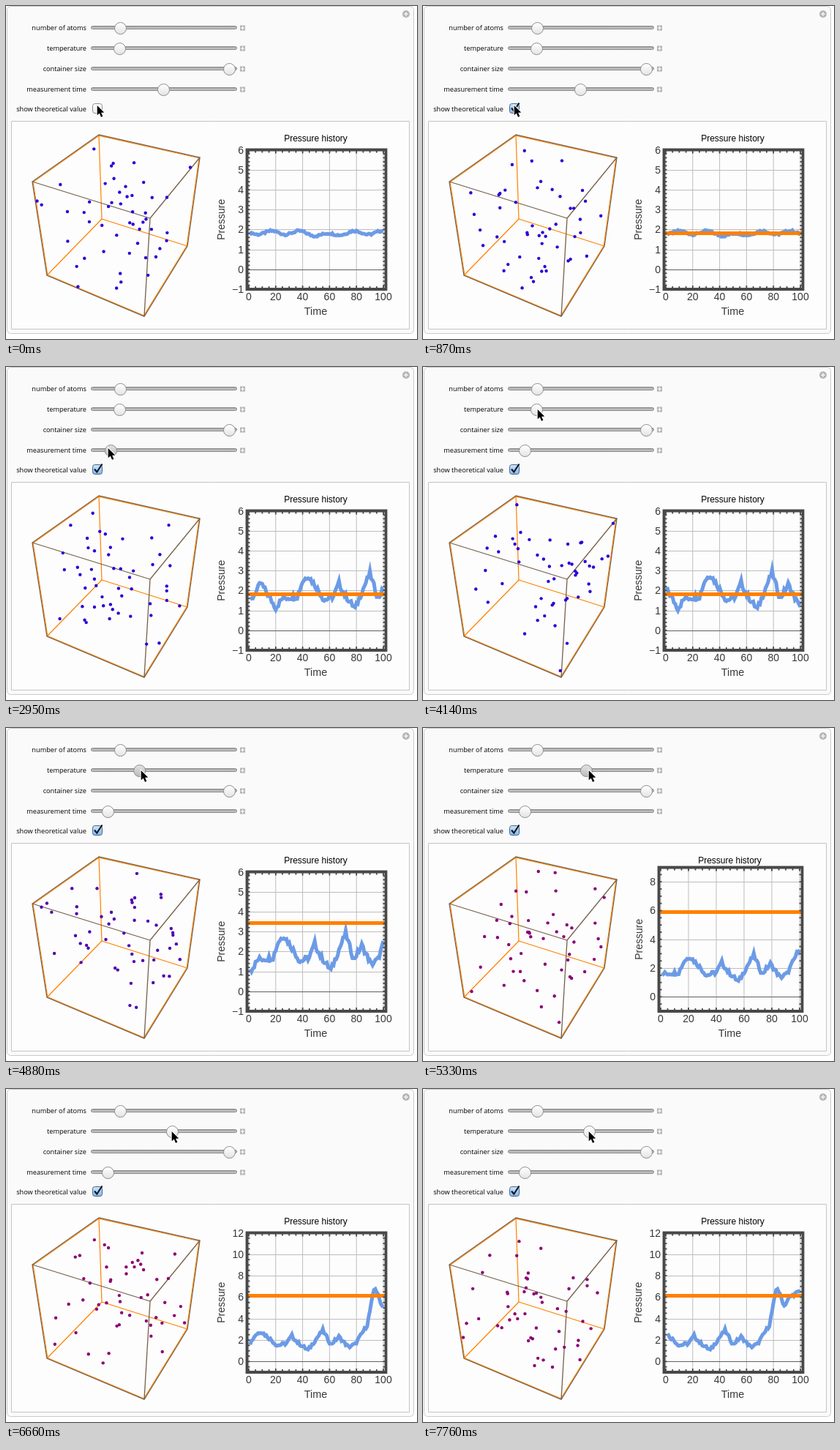
Write an HTML page with a canvas that moves like this. It is 562x455 px and loops after 8000 ms.

```html
<!DOCTYPE html>
<html lang="en">
<head>
<meta charset="utf-8">
<title>Gas pressure demo</title>
<style>
html, body { margin: 0; width: 100%; height: 100%; overflow: hidden; background: #fff; }
canvas { display: block; }
</style>
</head>
<body>
<canvas id="stage" width="562" height="455"></canvas>
<script>
const g = document.getElementById('stage').getContext('2d');
const LOOP = 8000, ATOMS = 50, ORANGE = '#ff8000', DARK = '#484848', INK = '#383838';
const SANS = '"Liberation Sans", Arial, sans-serif';

// Runs of picture updates: first time, last time, number of updates.
const RUNS = [[140, 430, 3], [730, 1760, 8], [1910, 2950, 8], [3250, 3840, 5], [4140, 4290, 2],
  [4580, 5330, 6], [5630, 6370, 6], [6660, 7170, 4], [7460, 7760, 3]];

// Key points: [position, value].
const CURSOR_X = [[730, 124], [1610, 211], [1910, 211], [2950, 139], [3250, 135], [3840, 156], [4580, 156], [5330, 226]];
const CURSOR_Y = [[730, 136], [1610, 112], [2950, 111], [3250, 111], [3840, 58]];
const MEASURE = [[1910, 215], [2950, 143], [3250, 139]];
const HEAT = [[4580, 155], [5330, 223], [5630, 227]];
const SWINGS = [[30, 1.4], [38, 2.4], [49, 1.1], [54, 1.6], [65, 1.7], [69, 2.5], [73, 2.8], [79, 2.2], [85, 1.5],
  [92, 1.7], [96, 2.4], [100, 1.8], [108, 1.05], [114, 2.1], [119, 2.9], [125, 1.6], [131, 2.3], [138, 1.35],
  [143, 1.6], [152, 3.4], [157.5, 7], [163, 5.2], [167, 6], [175, 6.6]];

// Box corners, indexed by bits: 1 = right, 2 = front, 4 = bottom.
const BOX = [[127, 176], [265, 207], [36, 240], [197, 290], [131, 291], [248, 328], [56, 368], [189, 424]];

const clamp = (v, a, b) => Math.min(b, Math.max(a, v));
const mix = (a, b, k) => a + (b - a) * k;
const crisp = v => Math.floor(v) + .5;
let seed = 7;
const rnd = () => (seed = seed * 16807 % 2147483647) / 2147483647;
const bell = () => (rnd() + rnd() + rnd() + rnd() - 2) * 1.7;
const triple = f => [f(), f(), f()];
const atoms = Array.from({ length: ATOMS }, () => ({ p: triple(rnd), v: triple(bell) }));

function keyed(keys, x) {
  const i = keys.findIndex(k => x < k[0]);
  if (i < 0) return keys[keys.length - 1][1];
  if (!i) return keys[0][1];
  const [x0, a] = keys[i - 1], [x1, b] = keys[i];
  return mix(a, b, (x - x0) / (x1 - x0));
}

function project(p) {
  return [0, 1].map(k => BOX.reduce((sum, c, i) => sum + c[k] *
    (i & 1 ? p[0] : 1 - p[0]) * (i & 2 ? p[1] : 1 - p[1]) * (i & 4 ? p[2] : 1 - p[2]), 0));
}

const bounce = x => { x = (x % 2 + 2) % 2; return x > 1 ? 2 - x : x; };

function lastUpdate(t) {
  let last = 0;
  for (const [a, b, n] of RUNS)
    if (t >= a) last = a + Math.floor(Math.min(1, (t - a) / (b - a)) * (n - 1) + .02) * (b - a) / (n - 1);
  return last;
}

// A long measurement averages the swings away; a short one keeps them.
function pressure(s, long) {
  const wave = Math.sin(s * 12.9898) * 43758.5453, noise = wave - Math.floor(wave) - .5;
  const calm = 1.84 + .09 * Math.sin((s - 12) * Math.PI / 10.25) - .13 * Math.exp(-(((s - 56) / 10) ** 2));
  return mix(keyed(SWINGS, s), calm, long) + noise * mix(.3, .1, long);
}

function line(points, color, width, close) {
  g.beginPath();
  points.forEach(p => g.lineTo(p[0], p[1]));
  if (close) g.closePath();
  g.strokeStyle = color;
  g.lineWidth = width;
  g.stroke();
}

function disc(x, y, r, fill, stroke) {
  g.beginPath();
  g.arc(x, y, r, 0, 7);
  g.fillStyle = fill;
  g.fill();
  if (!stroke) return;
  g.strokeStyle = stroke;
  g.lineWidth = 1;
  g.stroke();
}

function box(x, y, w, h, r, fill, stroke) {
  g.beginPath();
  g.roundRect(x, y, w, h, r);
  g.fillStyle = fill;
  g.fill();
  g.strokeStyle = stroke;
  g.lineWidth = 1;
  g.stroke();
}

function text(s, x, y, font, color, align) {
  g.font = font;
  g.fillStyle = color;
  g.textAlign = align;
  g.fillText(s, x, y);
}

function shade(y, h, top, bottom) {
  const s = g.createLinearGradient(0, y, 0, y + h);
  s.addColorStop(0, top);
  s.addColorStop(1, bottom);
  return s;
}

function plus(x, y, r) {
  line([[x - r, y], [x + r, y]], '#fff', 1.2);
  line([[x, y - r], [x, y + r]], '#fff', 1.2);
}

const label = (s, y) => text(s, 110, y, '500 9.2px "Open Sans", "Noto Sans", sans-serif', '#000', 'right');

function slider(name, y, x, pressed) {
  label(name, y + 3);
  box(116.5, y - 2.5, 199, 4, 2, shade(y - 2.5, 4, '#a2a2a2', '#d0d0d0'), '#868686');
  disc(x + .5, y + .5, 8, pressed ? shade(y - 7, 15, '#e2e2e2', '#bcbcbc') : shade(y - 7, 15, '#fff', '#e4e4e4'), '#8c8c8c');
  g.fillStyle = '#b4b4b4';
  g.fillRect(320, y - 3.5, 7, 7);
  plus(323.5, y, 2.5);
}

function checkbox(on) {
  label('show theoretical value', 144);
  box(118.5, 133.5, 13, 13, 3, on ? shade(133, 14, '#d3e8fb', '#7fb4ea') : shade(133, 14, '#fff', '#ececec'),
    on ? '#46658c' : '#8c8c8c');
  if (on) line([[121, 139.5], [124.3, 143.5], [131.5, 132.5]], '#101828', 2.2);
}

function gas(time, color) {
  const at = (...ids) => ids.map(i => BOX[i]);
  const hull = at(0, 1, 5, 7, 6, 2);
  for (const i of [0, 5, 6]) line(at(4, i), ORANGE, 1.2);
  line(hull, '#6b6259', 1.4, true);
  line(hull.map(([x, y]) => [mix(x, 152, .009), mix(y, 300, .009)]), ORANGE, 1.1, true);
  for (const i of [1, 2, 7]) line(at(3, i), '#76604a', 1.3);

  // Hotter atoms travel faster after the temperature drag.
  const ramp = clamp((time - 4580) / 1000, 0, 1);
  const travel = time + .84 * (ramp * ramp * 500 + Math.max(0, time - 5580));
  for (const { p, v } of atoms) {
    const [x, y] = project(p.map((start, k) => bounce(start + v[k] * travel * .0006)));
    disc(x, y, 2.2, color);
  }
}

function plot(time, measure, theory, showTheory) {
  const top = Math.max(6, 3 * Math.ceil(theory / 2)), wide = top === 9;
  const x0 = wide ? 325 : 332, x100 = wide ? 515 : 516;
  const left = x0 - 2.5, right = x100 + 3.5, high = wide ? 190.5 : 196.5, low = 387;
  const X = v => mix(x0, x100, v / 100), Y = v => low - (v + 1) * (low - high) / (top + 1);
  const major = top > 6 ? 2 : 1, first = top > 6 ? 0 : -1, minor = top > 6 ? .5 : .2;
  const mid = (left + right) / 2 - .5, font = '14px ' + SANS;

  for (let v = 0; v <= 100; v += 20) {
    line([[X(v), high], [X(v), low]], '#bdbdbd', 1);
    text(v, X(v), 402, font, INK, 'center');
  }
  for (let v = first; v <= top; v += major) {
    const y = crisp(Y(v) + .5);
    line([[left, y], [right, y]], v ? '#bdbdbd' : '#606060', 1);
    if (Y(v) < high + 1 && wide) continue;
    text(String(v).replace('-', '\u2212'), left - 4.5, Y(v) + 5, font, INK, 'right');
  }

  const offset = Math.floor(time / 104 + .8), long = (measure - 139) / 76;
  line(Array.from({ length: 100 }, (_, i) => [X(i + 1), Y(pressure(i + 1 + offset, long))]), '#6c9be6', 5);
  if (showTheory) line([[left, crisp(Y(theory))], [right, crisp(Y(theory))]], ORANGE, 5);

  for (let v = 0; v <= 100; v += 5) {
    const n = v % 20 ? 4 : 5;
    line([[X(v), high], [X(v), high + n]], DARK, 1.8);
    line([[X(v), low], [X(v), low - n]], DARK, 1.8);
  }
  for (let k = 0; k * minor <= top + 1.01; k++) {
    const y = Y(k * minor - 1);
    line([[left, y], [left + 4, y]], DARK, 1.8);
    line([[right, y], [right - 4, y]], DARK, 1.8);
  }
  line([[left, high], [right, high], [right, low], [left, low]], DARK, 3.8, true);

  text('Pressure history', mid - .5, 185, '12px ' + SANS, '#000', 'center');
  text('Time', mid - .5, 422, '14.4px ' + SANS, INK, 'center');
  g.save();
  g.translate(wide ? 300 : 299, (high + low) / 2);
  g.rotate(-Math.PI / 2);
  text('Pressure', 0, 0, font, INK, 'center');
  g.restore();
}

function cursor(x, y) {
  const arrow = [[0, 0], [0, 14.5], [3.3, 11.4], [5.8, 17], [8.3, 15.9], [5.9, 10.5], [10.4, 10.3]];
  g.save();
  g.translate(x + .7, y);
  g.scale(.92, .92);
  line(arrow, '#fff', 2.2, true);
  g.fillStyle = '#000';
  g.fill();
  g.restore();
}

function draw(t) {
  const time = lastUpdate(t);
  const measure = keyed(MEASURE, time), heat = keyed(HEAT, time);
  const theory = 1.8 + (heat - 155) * .06, red = (heat - 124) / 186, on = time >= 140;

  g.fillStyle = '#fff';
  g.fillRect(0, 0, 562, 455);
  box(1.5, .5, 556, 447, 5, '#fafafa', '#cbcbcb');
  box(7.5, 157.5, 544, 284, 0, '#fdfdfd', '#c4c4c4');
  disc(547, 11, 5, '#b4b4b4');
  plus(547, 11, 3);

  slider('number of atoms', 30, 156, false);
  slider('temperature', 58, heat, time >= 4580 && time < 5630);
  slider('container size', 86, 305, false);
  slider('measurement time', 114, measure, time >= 1910 && time < 3250);
  checkbox(on);

  gas(time, `rgb(${Math.round(255 * red)}, 0, ${Math.round(255 * (1 - red))})`);
  plot(time, measure, theory, on);
  cursor(keyed(CURSOR_X, time), keyed(CURSOR_Y, time));
}

function loop() {
  draw(performance.now() % LOOP);
  requestAnimationFrame(loop);
}
loop();
</script>
</body>
</html>
```
